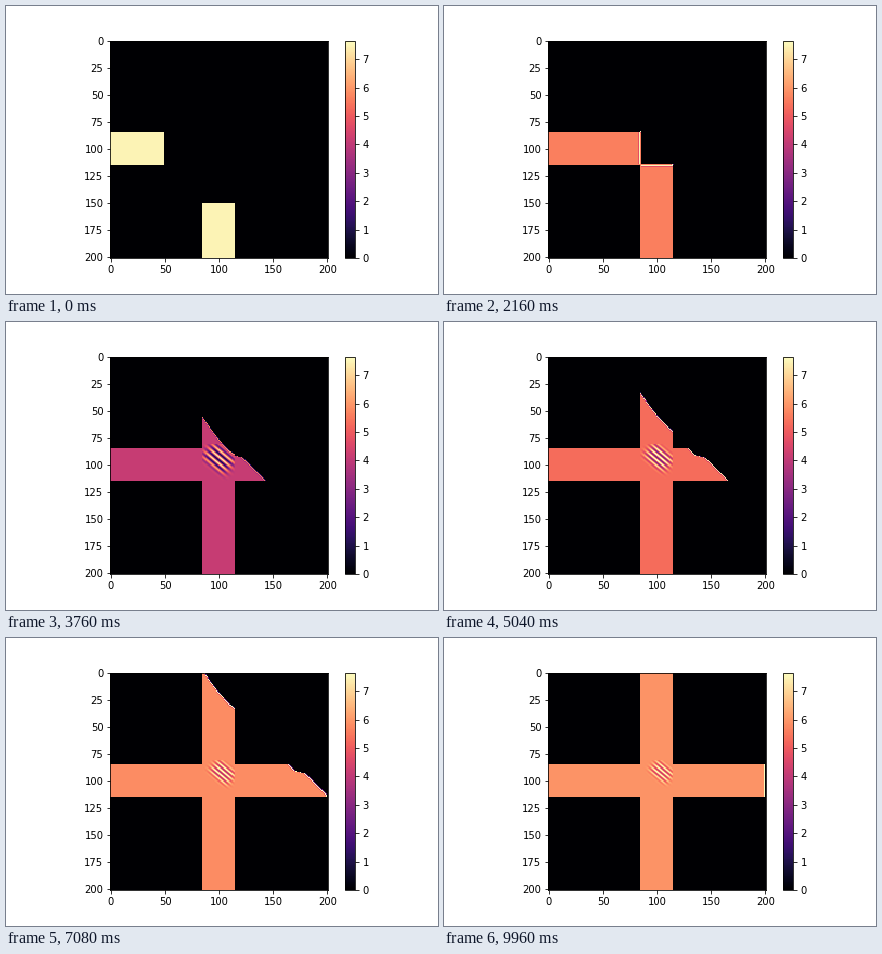
These frames come from a looping animation (432 by 288 pixels, 10 s). A matplotlib script:

```python
import numpy as np
import matplotlib.pyplot as plt
from matplotlib.animation import FuncAnimation

SIZE = 201
FRAMES = 250
PEAK = 7.66
LOW, HIGH = 84, 114            # the beams fill the cells after LOW up to HIGH
WIDTH = HIGH - LOW
MEET, MERGED = 53, 94          # beams reach the crossing, both have filled it

rows, cols = np.mgrid[0:SIZE, 0:SIZE]
in_row = (rows > LOW) & (rows <= HIGH)
in_col = (cols > LOW) & (cols <= HIGH)

# How far each strand trails the leading edge after the crossing.
u = np.clip(HIGH - rows, 0, WIDTH)
lag_across = u + 7 / (1 + np.exp(3 * (22 - u)))
u = np.clip(cols - LOW, 0, WIDTH)
lag_up = -2 + 1.6 * u - 0.013 * u ** 2


def ease(n, start, end):
    t = np.clip((n - start) / (end - start), 0, 1)
    return t * t * (3 - 2 * t)


def decay(n, tau):
    return np.exp(-max(n - MERGED, 0) / tau)


def reach(s, lag):
    """Distance of the front past the entry side of the crossing."""
    if s < 0:
        return np.full(lag.shape, s)
    slowed = s * WIDTH / np.maximum(lag, WIDTH)
    return np.where(s < lag, slowed, s + WIDTH - lag)


def beam(depth, level, ripple):
    """Profile behind a front: faint tip, overshoot, dip, full beam."""
    tip = np.clip(depth + 1, 0, 1) * 0.5 * ripple
    shape = np.select([depth < 0, depth < 1, depth < 2],
                      [tip, 1 + 0.34 * ripple, 1 - 0.16 * ripple], 1.0)
    return np.where(depth > -1, shape * level, 0)


def beam_level(n):
    before = 0.735 + 0.245 * np.exp(-n / 2)
    after = 0.775 - 0.235 * decay(n, 30)
    return before + (after - before) * ease(n, MEET, MERGED - 15)


def fringes(n):
    """Slanted stripes that shrink and drift to the upper right."""
    k = decay(n, 80)
    dx, dy = cols - (105 - 5 * k), rows - (91 + 3 * k)
    tilt = np.radians(40)
    across = dx * np.sin(tilt) - dy * np.cos(tilt)
    along = dx * np.cos(tilt) + dy * np.sin(tilt)
    env = np.exp(-(across / (7 + 3 * k)) ** 4 - (along / (10 + 4 * k)) ** 4)
    period = 3.6 + 1.2 * decay(n, 30)
    amp = (0.22 + 0.2 * k) * ease(n, MEET, MERGED - 15)
    return amp * env * np.sin(2 * np.pi * across / period)


def field(n):
    s = (n - MEET) * (0.66 if n < MEET else 0.7)
    level = beam_level(n)
    ripple = min(n / 4, 1)

    depth_x = LOW + reach(s, lag_across) - cols
    depth_y = rows - 1 - HIGH + reach(s, lag_up)
    across = np.where(in_row, beam(depth_x, level, ripple), 0)
    up = np.where(in_col, beam(depth_y, level, ripple), 0)

    # Where both beams are present the one further behind its front wins.
    both = (across > 0) & (up > 0)
    deeper = np.where(depth_x > depth_y, across, up)
    img = np.where(both, deeper, np.maximum(across, up))

    lit = in_col & (rows > LOW - 4) & (rows <= HIGH) & (img > 0)
    img = img + np.where(lit, fringes(n), 0)

    # The outflow side keeps a bright column and an empty border.
    img[in_row[:, -2] & (depth_x[:, -2] > 0), -2] = 1
    img[:, -1] = 0
    return PEAK * np.clip(img, 0, 1)


fig, ax = plt.subplots(figsize=(6, 4), dpi=72)
fig.subplots_adjust(left=0.125, right=0.9, bottom=0.125, top=0.88)
image = ax.imshow(field(0), cmap="magma", vmin=0, vmax=PEAK, interpolation="nearest")
fig.colorbar(image, ax=ax)


def update(n):
    image.set_data(field(n))
    return [image]


anim = FuncAnimation(fig, update, frames=FRAMES, interval=40, repeat=True,
                     repeat_delay=0, blit=False)
plt.show()
```
